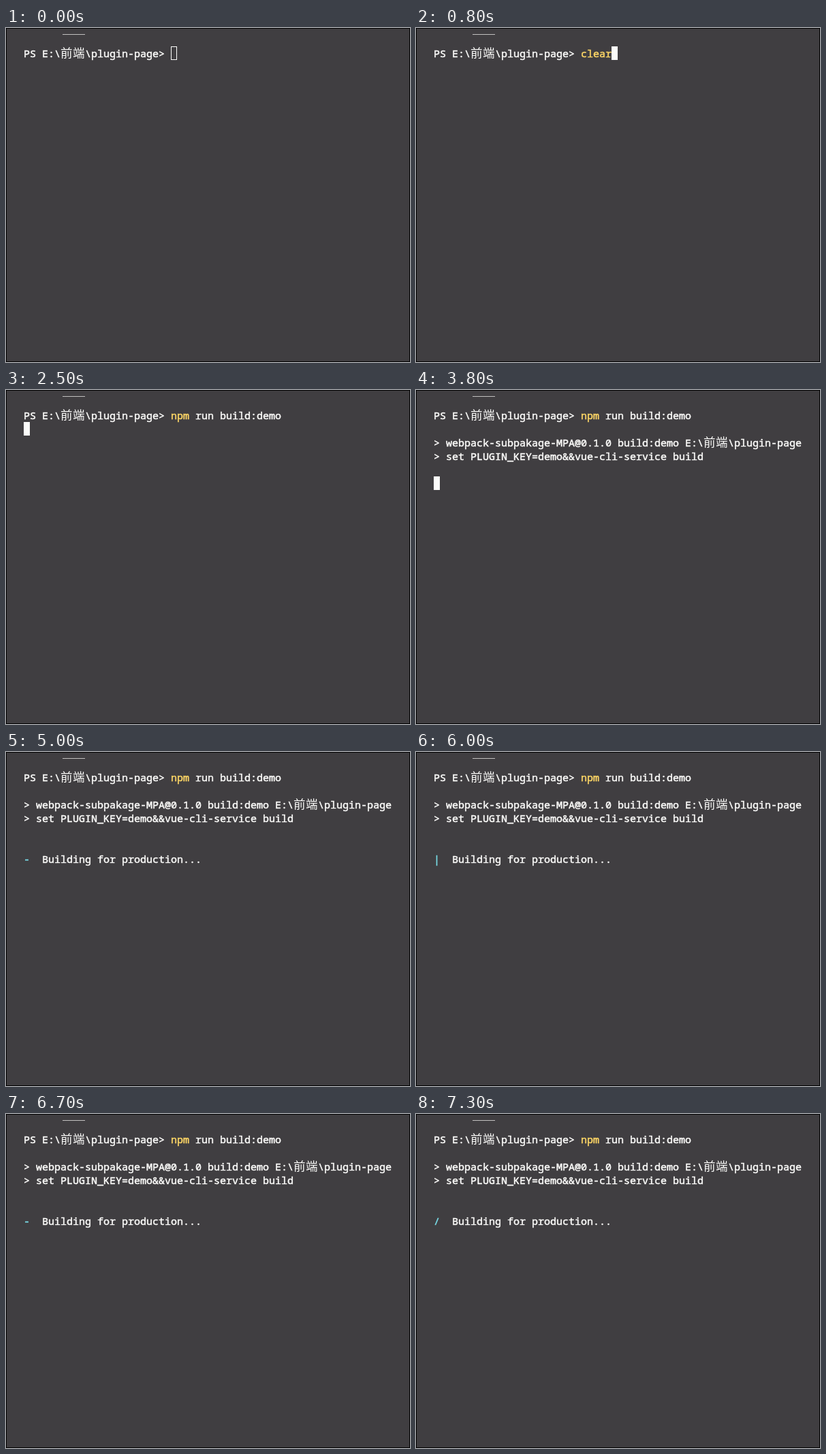
An HTML page that plays this animation: 593 px wide and 491 px high, repeating every 8000 ms.

```html
<!DOCTYPE html>
<html lang="en">
<head>
<meta charset="utf-8">
<title>Terminal build</title>
<style>
  html, body { margin: 0; width: 100%; height: 100%; overflow: hidden; background: #403e41; }
  svg { display: block; width: 593px; height: 491px; }
  text {
    font: 500 15px "Noto Sans Mono", "DejaVu Sans Mono", monospace;
    white-space: pre; fill: #fcfcfa; stroke: #fcfcfa; stroke-width: .5px;
  }
  .wide { font: 300 17.5px "Noto Sans CJK SC", "Noto Sans CJK", "Noto Sans CJK JP", sans-serif; stroke: none; }
  .cmd { fill: #ffd866; stroke: #ffd866; }
  .spin { fill: #78dce8; stroke: #78dce8; }
</style>
</head>
<body>
<svg viewBox="0 0 593 491">
  <rect x=".5" y=".5" width="592" height="490" fill="#403e41" stroke="#000"/>
  <rect x="83" y="9" width="33" height="1" fill="#c1c0c0"/>
  <g id="screen"></g>
  <rect id="cursor"/>
</svg>
<script>
const LOOP = 8000, LEFT = 26, TOP = 27, CELL = 9, ROW = 20;
const NS = "http://www.w3.org/2000/svg";
const screen = document.getElementById("screen");
const cursor = document.getElementById("cursor");

function write(col, row, str, cls = "") {
  const el = document.createElementNS(NS, "text");
  el.setAttribute("x", LEFT + col * CELL);
  el.setAttribute("y", TOP + row * ROW + 16);
  if (cls) el.setAttribute("class", cls);
  el.textContent = str;
  return screen.appendChild(el);
}

// Wide characters take two cells each.
function writePath(col, row, tail) {
  return [
    write(col, row, "E:\\"),
    write(col + 3, row, "前", "wide"),
    write(col + 5, row, "端", "wide"),
    write(col + 7, row, tail)
  ];
}

write(0, 0, "PS");
writePath(3, 0, "\\plugin-page>");

const clear = [write(24, 0, "clear", "cmd")];
const run = [write(24, 0, "npm", "cmd"), write(28, 0, "run build:demo")];
const log = [
  write(0, 2, "> webpack-subpakage-MPA@0.1.0 build:demo"),
  ...writePath(41, 2, "\\plugin-page"),
  write(0, 3, "> set PLUGIN_KEY=demo&&vue-cli-service build")
];
const status = [write(3, 6, "Building for production...")];
const spinner = write(0, 6, "", "spin");

// Each step: start time, visible groups, cursor cell, spinner glyph
const steps = [
  { at: 0, show: [], cur: [24, 0], hollow: true },
  { at: 200, show: [], cur: [24, 0] },
  { at: 800, show: [clear], cur: [29, 0] },
  { at: 1300, show: [], cur: [24, 0] },
  { at: 1400, show: [run], cur: [42, 0] },
  { at: 2500, show: [run], cur: [0, 1] },
  { at: 3800, show: [run, log], cur: [0, 5] }
];
const building = (at, spin) => steps.push({ at, show: [run, log, status], spin });
building(5000, "-");
building(5800, "\\");
building(6000, "|");
building(6100, "/");
steps.push({ at: 6600, show: [run, log] });
building(6700, "-");
building(7100, "\\");
building(7200, "|");
building(7300, "/");

function setCursor(cell, hollow) {
  cursor.style.display = cell ? "" : "none";
  if (!cell) return;
  const inset = hollow ? 0.5 : 0;
  const attrs = {
    x: LEFT + cell[0] * CELL + inset,
    y: TOP + cell[1] * ROW + inset,
    width: CELL - 2 * inset,
    height: ROW - 2 * inset,
    fill: hollow ? "none" : "#fcfcfa",
    stroke: hollow ? "#fcfcfa" : "none"
  };
  for (const key in attrs) cursor.setAttribute(key, attrs[key]);
}

function draw(time) {
  const step = steps.filter(s => s.at <= time).pop();
  for (const group of [clear, run, log, status]) {
    const visible = step.show.includes(group);
    for (const el of group) el.style.display = visible ? "" : "none";
  }
  spinner.textContent = step.spin || "";
  setCursor(step.cur, step.hollow);
}

const start = performance.now();
function tick() {
  draw((performance.now() - start) % LOOP);
  requestAnimationFrame(tick);
}
tick();
</script>
</body>
</html>
```
